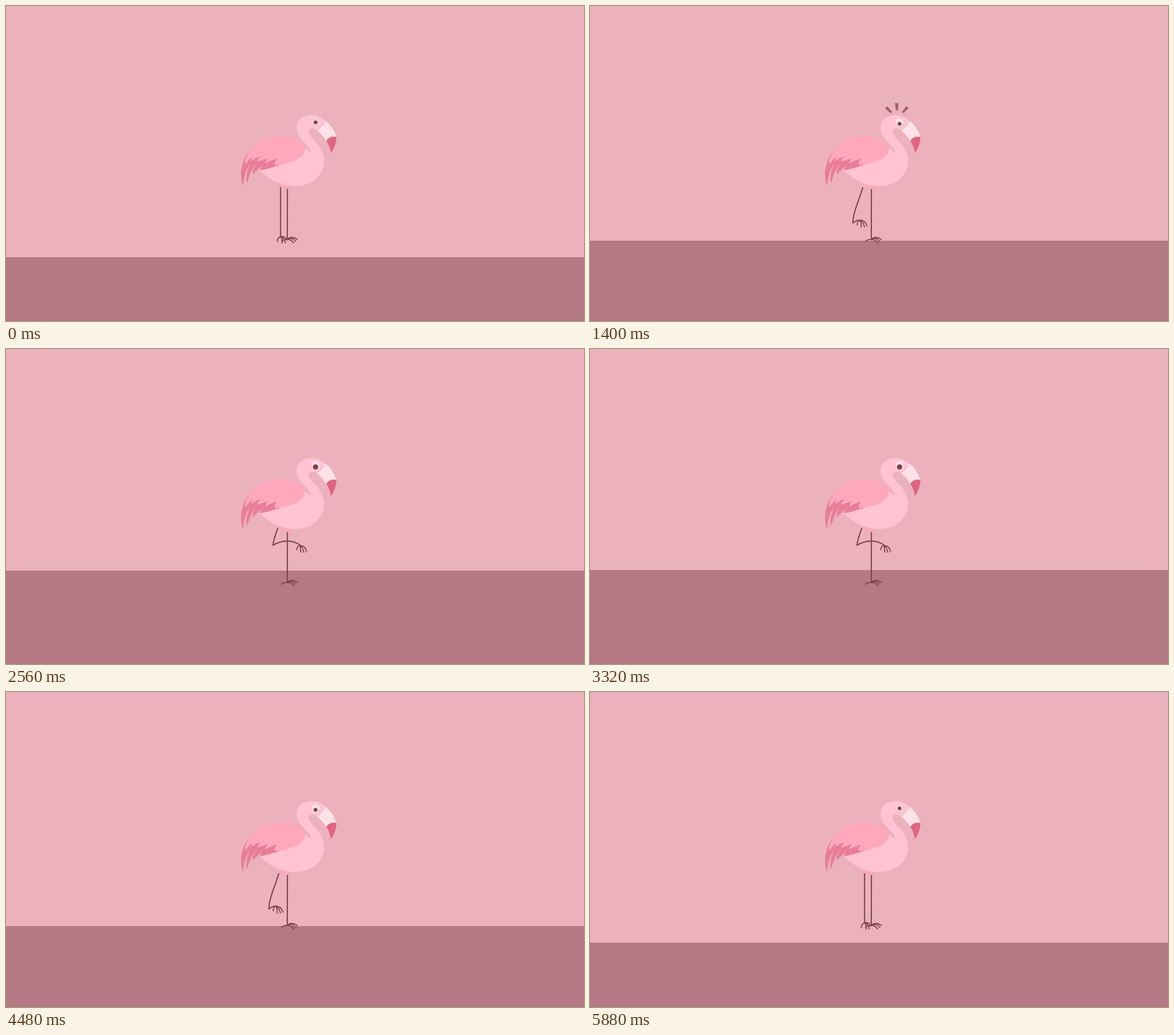
Recreate the animation shown at these times as an HTML page. Size 1013 by 553 pixels, loop 5.94 s.

```html
<!DOCTYPE html>
<html lang="en">
<head>
<meta charset="utf-8">
<title>Flamingo</title>
<style>
  html, body { margin: 0; width: 100%; height: 100%; overflow: hidden; background: #ebb1bc; }
  svg { display: block; width: 100%; height: 100%; }

  .leg path { fill: none; stroke: #7f4450; stroke-width: 2.1; stroke-linecap: round; stroke-linejoin: round; }
  .leg .toes { stroke-width: 1.8; }
  .pale { fill: #ffe1e7; }
  .pupil { fill: #743f4b; }

  .water { fill: #7f434e; opacity: .5; animation: tide 5940ms infinite; }
  .stand, .half, .tuck, .alert, .wide { animation: 5940ms step-end infinite; }
  .stand { animation-name: stand; }
  .half { animation-name: half; }
  .tuck { animation-name: tuck; }
  .alert { animation-name: alert; }
  .wide { animation-name: wide; }

  @keyframes tide {
    0% { transform: translateY(441.5px); animation-timing-function: cubic-bezier(.333, .354, .667, .687); }
    49.9% { transform: translateY(381px); animation-timing-function: cubic-bezier(.333, .313, .667, .646); }
    100% { transform: translateY(441.5px); }
  }
  @keyframes stand {
    0%, 80%, 100% { visibility: visible; }
    20% { visibility: hidden; }
  }
  @keyframes half {
    0%, 40%, 80%, 100% { visibility: hidden; }
    20%, 60% { visibility: visible; }
  }
  @keyframes tuck {
    0%, 60%, 100% { visibility: hidden; }
    40% { visibility: visible; }
  }
  @keyframes alert {
    0%, 40%, 100% { visibility: hidden; }
    20% { visibility: visible; }
  }
  @keyframes wide {
    0%, 80%, 100% { visibility: hidden; }
    20% { visibility: visible; }
  }
</style>
</head>
<body>
<svg viewBox="0 0 1013 553" preserveAspectRatio="none">
  <!-- belly and body -->
  <path fill="#ffa8bc" d="M477 312Q480 318 487 319.500Q496 321 503 315Z"/>
  <path fill="#ffc3d2" d="M560 201.500C553 195 545 191.500 535 191.500C519 191.500 509 202 509 214
    C509 230 527 242 534.500 253.500Q534 256 531 255Q527 253 523 249L450 268L445 289
    C460 302 478 316 506 316C533 316 553 301 557 279C559 262 552 249 544 240
    C537 232 530 226 530 221C530 215 539 213 545.500 218.500Z"/>

  <!-- tail and wing -->
  <path fill="#e97d99" d="M436 246C420 258 411 280 412 298C412 306 414 312 415.500 316
    C417 300 420 288 428 276C423 288 420 300 422 311C427 298 430 286 440 275
    C434 284 431 290 433 295C440 288 444 284 450 279C446 283 444 286 446 288
    C456 287 468 283 480 279L470 255Z"/>
  <path fill="#ffa8bc" d="M523.500 249C520 236 500 229 479 229C455 229 435 240 425 258
    C421 265 418 273 419 277C422 277 426 268 432 264C430 268 429 271 430 272
    C436 268 440 265 446 264C442 268 439 272 441 273C448 271 453 269 460 267
    C456 271 453 275 455 276C462 272 468 270 475 268C471 273 469 277 473 279.500
    C488 278 502 274 511 269C521 263 525 257 523.500 249Z"/>

  <!-- beak -->
  <path class="pale" d="M560 201.500C569 208 576 219 579 230Q568 228 561.500 237Q554 226 545.500 218.500Q554 212 560 201.500Z"/>
  <path fill="#df6681" d="M579 230Q567 227 561.500 237Q568 247 569.500 258.500Q579 245 579 230Z"/>

  <!-- eye -->
  <g class="stand">
    <circle class="pale" cx="542.500" cy="204" r="4.900"/>
    <circle class="pupil" cx="542.500" cy="204.200" r="3.300"/>
  </g>
  <circle class="wide pale" cx="542.500" cy="204" r="7"/>
  <circle class="half pupil" cx="542.500" cy="206.800" r="3.300"/>
  <circle class="tuck pupil" cx="542.500" cy="207" r="4.600"/>

  <path class="alert" fill="#a0616f" d="M534.500 170.500H541L539.500 183.500H536Z
    M517 180L521 176L529.500 186L527 188.200Z M554.500 176L558.500 179.500L549 188.200L546.500 186Z"/>

  <!-- legs -->
  <g class="leg">
    <path d="M493.200 322L493 409"/>
    <path class="toes" d="M493 409Q502 403 510.500 410M494 408.500Q503 407 508 413.500
      M493 409.500Q500 410 504 416M493 410Q487 409 483 413"/>
  </g>
  <g class="leg stand">
    <path d="M481.200 319V405"/>
    <path class="toes" d="M481 405.500Q476 406 475.500 413.500M481 405Q485 409 484 416.500
      M481 405Q488 406 489.500 416M481 405Q489 403 492 411"/>
  </g>
  <g class="leg half">
    <path d="M478 319C473 337 461 361 460.700 381Q467 375.500 473 376"/>
    <path class="toes" d="M472 376Q468 379 468.500 384.500M473 376Q476 381 475 388
      M473 376Q479 379 481 388M473 376Q482 376 485.500 386.500"/>
  </g>
  <g class="leg tuck">
    <path d="M476 315.500Q470 331 467.800 344.500C484 335 502 334 517 345.500"/>
    <path class="toes" d="M517 345.500Q510 345 509.300 352.500M517 345.500Q515 350 517 356.500
      M517 345.500Q520.500 350 522 357M517 345.500Q525 346 526.500 355.500"/>
  </g>

  <rect class="water" width="1013" height="200"/>
</svg>
</body>
</html>
```
